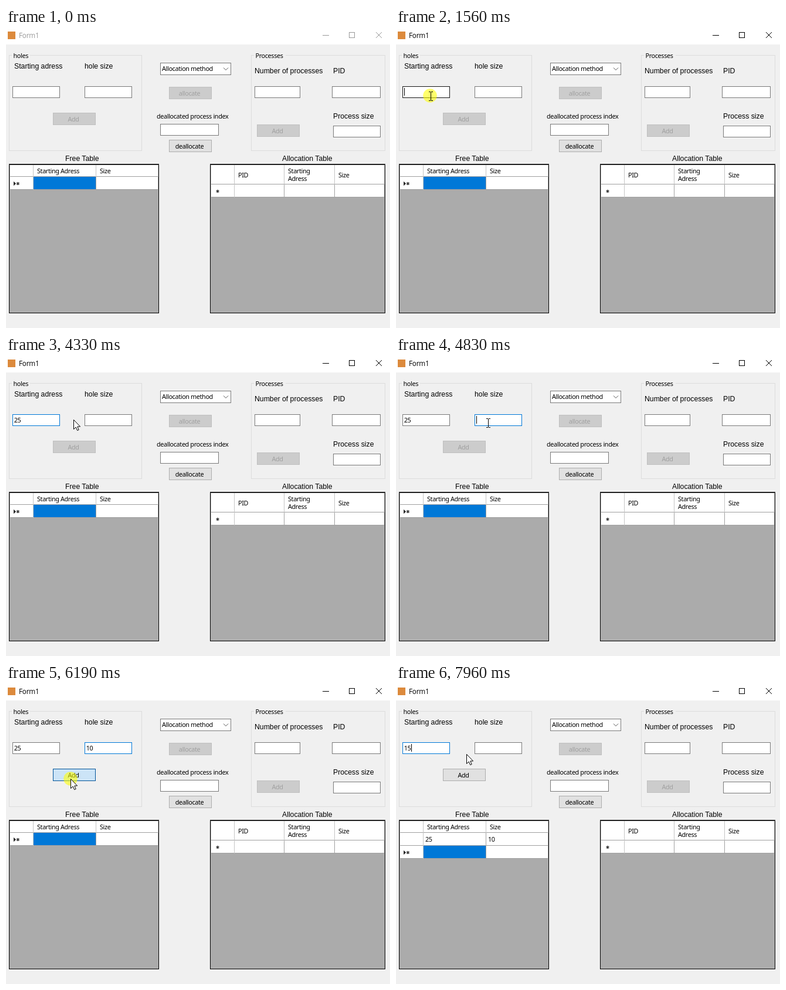
Animation of 655 by 510 pixels, one loop 8 s. Source, as an HTML page:

```html
<!DOCTYPE html>
<html lang="en">
<head>
<meta charset="utf-8">
<title>Form1</title>
<style>
  html, body { margin: 0; width: 100%; height: 100%; overflow: hidden; background: #f0f0f0; }
  svg { display: block; width: 655px; height: 510px; }
  rect, .line { shape-rendering: crispEdges; }
  text { font: 10.8px Tahoma, "Noto Sans", "Open Sans", sans-serif; letter-spacing: -.35px; white-space: pre; }
  .label { font: 12.25px "Liberation Sans", Arial, sans-serif; letter-spacing: 0; }
  .title { font: 11.7px "Open Sans", "Noto Sans", sans-serif; letter-spacing: -.2px; }
  .mid { text-anchor: middle; }
</style>
</head>
<body>
<svg id="stage" viewBox="0 0 655 510"></svg>
<script>
const LOOP = 8000, BLINK = 530;
const GRAY = '#7a7a7a', BLUE = '#0078d7', DARK = '#171717', GRID = '#a0a0a0', SOFT = '#e2e2e2';

const FIELDS = {
  addr: [11, 99, 81, 20], size: [134, 99, 81, 20], count: [424, 99, 78, 20],
  pid: [556, 99, 83, 20], procSize: [558, 166, 81, 20], index: [263, 163, 100, 20]
};
const ADD = [80, 144, 73, 21];

// [start time, value]
const ADDR_TEXT = [[0, ''], [3220, '2'], [3430, '25'], [6300, ''], [7470, '1'], [7640, '15']];
const SIZE_TEXT = [[0, ''], [5210, '1'], [5370, '10'], [6300, '']];
const FOCUS = [[0, ''], [1560, 'addr'], [4730, 'size'], [7040, 'addr']];
const CARET_RESETS = [1560, 1730, 3220, 3430, 4730, 5210, 5370, 7070, 7470, 7640].map(t => [t]);
const PRESSES = [[1560, 1730], [4700, 4800], [6190, 6300], [7040, 7200]];
const HIDDEN = [[0, 50], [3220, 3940], [7470, 7600]];
const ROW_ADDED = 6300;

// Pointer way points: [time, x, y]
const PATH = [
  [50, 519, 464], [230, 410, 350], [420, 245, 190], [600, 110, 92], [700, 72, 77],
  [850, 58, 113], [910, 59, 116], [3940, 59, 116], [4300, 112, 108], [4700, 157, 114],
  [4990, 157, 114], [5050, 132, 87], [5410, 132, 87], [5700, 120, 128], [5990, 110, 161],
  [6330, 110, 161], [6500, 84, 128], [6670, 61, 109], [6940, 61, 109], [7040, 64, 108],
  [7600, 64, 108], [7780, 94, 112], [7930, 120, 119]
];

const rect = (x, y, w, h, fill, stroke, id = '') => stroke
  ? `<rect id="${id}" x="${x + .5}" y="${y + .5}" width="${w - 1}" height="${h - 1}" fill="${fill}" stroke="${stroke}"/>`
  : `<rect id="${id}" x="${x}" y="${y}" width="${w}" height="${h}" fill="${fill}"/>`;
const text = (x, y, s, cls = '', fill = '#000', id = '') =>
  `<text id="${id}" class="${cls}" x="${x}" y="${y}" fill="${fill}">${s}</text>`;
const label = (x, y, s) => text(x, y, s, 'label');
const hline = (x, y, w, color) => rect(x, y, w, 1, color);
const vline = (x, y, h, color) => rect(x, y, 1, h, color);
const group = (x, w, gap, s) => rect(x, 46, w, 163, 'none', '#dcdcdc')
  + rect(x + 5, 45, gap, 3, '#f0f0f0') + text(x + 7.5, 51, s);
const button = (x, y, s, enabled, id = '') =>
  rect(x, y, 73, 21, enabled ? '#e1e1e1' : '#ccc', enabled ? '#adadad' : '#bfbfbf', id && id + 'Box')
  + text(x + 35, y + 15, s, 'mid', enabled ? '#000' : GRID, id && id + 'Text');
const star = (x, y) =>
  `<path d="M${x} ${y - 2.7}v5.4M${x - 2.4} ${y - 1.4}l4.8 2.8m0-2.8l-4.8 2.8" stroke="#222" stroke-width="1.1"/>`;

function row(cols, y, h, header) {
  const x = cols[0], w = cols[cols.length - 1] - x + 1;
  return rect(x, y, w, h, '#fff') + hline(x, y + h, w, GRID)
    + cols.slice(1).map((c, i) => vline(c, y, h + 1, header || !i ? '#c4c4c4' : GRID)).join('');
}

function table(x, w, cols, headerHeight) {
  return rect(x, 231, w, 254, '#ababab', '#000') + hline(x, 232, w, '#444')
    + row(cols, 233, headerHeight, true) + row(cols, 234 + headerHeight, 21);
}

const FREE = [7, 46, 153, 259], ALLOC = [350, 389, 474, 560, 645];

document.getElementById('stage').innerHTML =
  rect(0, 0, 655, 510, '#f0f0f0') + rect(0, 0, 655, 28, '#fff')
  + rect(3, 6, 13, 13, '#dc8a3c') + text(22, 17, 'Form1', 'title', '#000', 'title')
  + `<g id="controls" fill="none" stroke="#000"><path class="line" d="M540 12.5h11"/>
     <rect x="585.5" y="7.5" width="9" height="9"/><path d="M631 7l10 10m0-10l-10 10"/></g>`
  + group(5, 227, 31, 'holes') + group(418, 229, 54, 'Processes')
  + label(14, 69, 'Starting adress') + label(134, 69, 'hole size')
  + label(424, 77, 'Number of processes') + label(558, 77, 'PID') + label(558, 154, 'Process size')
  + label(101, 226, 'Free Table') + label(471, 226, 'Allocation Table')
  + Object.entries(FIELDS).map(([id, box]) => rect(...box, '#fff', GRAY, id)).join('')
  + rect(263, 59, 121, 21, '#fff', GRAY) + text(266, 73, 'Allocation method')
  + '<path d="M371 67.5l4 4 4-4" fill="none" stroke="#555"/>'
  + button(278, 100, 'allocate', false) + button(80, 144, 'Add', false, 'add')
  + button(428, 164, 'Add', false) + button(278, 190, 'deallocate', true)
  + text(257, 154, 'deallocated process index')
  + table(5, 256, FREE, 19) + text(53, 247, 'Starting Adress') + text(160, 247, 'Size')
  + `<g id="newRow">${row(FREE, 275, 21)}${text(50, 268, '25')}${text(157, 268, '10')}</g>`
  + `<g id="marker">${rect(47, 253, 106, 21, BLUE)}<path d="M13 260.8l4 3.7-4 3.7z" fill="#222"/>${star(20.3, 264.5)}</g>`
  + table(348, 299, ALLOC, 32) + text(396, 254, 'PID') + text(481, 247, 'Starting')
  + text(481, 260, 'Adress') + text(567, 254, 'Size') + star(361, 277.5)
  + text(13.7, 113, '', '', '#000', 'addrText') + text(136.7, 113, '', '', '#000', 'sizeText')
  + rect(14, 102, 1, 13, '#000', '', 'caret')
  + '<circle id="glow" r="11.8" fill="#ff0" opacity=".58"/>'
  + `<g id="pointer">
      <path id="arrow" d="M.5.5V16.5L4.2 13L6.7 18.6L9.2 17.5L6.8 12H11.6Z" fill="#fff" stroke="#000"/>
      <path id="beam" class="line" d="M-3 -7.5h3m1 0h3M.5 -7V7M-3 7.5h3m1 0h3" fill="none" stroke="#000"/></g>`;

const el = id => document.getElementById(id);
const set = (id, attrs) => { for (const k in attrs) el(id).setAttribute(k, attrs[k]); };
const show = (id, on) => set(id, { visibility: on ? 'visible' : 'hidden' });
const last = (list, t) => list.reduce((found, step) => step[0] <= t ? step : found, list[0]);
const during = (spans, t) => spans.some(([a, b]) => t >= a && t < b);
const inside = ([x, y, w, h], p) => p.x >= x && p.x < x + w && p.y >= y && p.y < y + h;

function pointerAt(t) {
  const i = PATH.findIndex(p => p[0] > t);
  const [, x, y] = i < 0 ? PATH[PATH.length - 1] : PATH[Math.max(i - 1, 0)];
  if (i < 1) return { x, y };
  const [t0] = PATH[i - 1], [t1, x1, y1] = PATH[i], k = (t - t0) / (t1 - t0);
  return { x: Math.round(x + (x1 - x) * k), y: Math.round(y + (y1 - y) * k) };
}

function borderColor(id, t, pointer, visible) {
  const [since, focused] = last(FOCUS, t);
  const settled = t - since >= 100;
  if (focused === id) return settled ? BLUE : DARK;
  if (!settled && last(FOCUS, since - 1)[1] === id) return BLUE;
  return visible && inside(FIELDS[id], pointer) ? DARK : GRAY;
}

function render(t) {
  const p = pointerAt(t), visible = !during(HIDDEN, t), pressed = during(PRESSES, t);
  const active = t >= 1560, added = t >= ROW_ADDED;
  set('title', { fill: active ? '#000' : '#999' });
  set('controls', { stroke: active ? '#000' : '#999' });

  const values = { addr: last(ADDR_TEXT, t)[1], size: last(SIZE_TEXT, t)[1] };
  for (const id in values) {
    el(id + 'Text').textContent = values[id];
    set(id, { stroke: borderColor(id, t, p, visible) });
  }

  const focused = last(FOCUS, t)[1];
  const caretOn = focused && Math.floor((t - last(CARET_RESETS, t)[0]) / BLINK) % 2 === 0;
  show('caret', caretOn);
  if (focused) set('caret', { x: FIELDS[focused][0] + 3 + 6 * values[focused].length });

  const hover = visible && inside(ADD, p);
  const [fill, stroke] = t < 5210 ? ['#ccc', '#bfbfbf']
    : hover && pressed ? ['#cce4f7', '#005499']
    : hover ? ['#e5f1fb', BLUE] : ['#e1e1e1', '#adadad'];
  set('addBox', { fill, stroke });
  set('addText', { fill: t < 5210 ? GRID : '#000' });

  show('newRow', added);
  set('marker', { transform: `translate(0 ${added ? 22 : 0})` });

  const overField = Object.values(FIELDS).some(box => inside(box, p));
  show('arrow', visible && !overField);
  show('beam', visible && overField);
  set('pointer', { transform: `translate(${p.x} ${p.y})` });
  show('glow', pressed);
  set('glow', { cx: overField ? p.x - 1 : p.x, cy: overField ? p.y - 1 : p.y });
}

const start = performance.now();
function tick() {
  render((performance.now() - start) % LOOP);
  requestAnimationFrame(tick);
}
tick();
</script>
</body>
</html>
```
